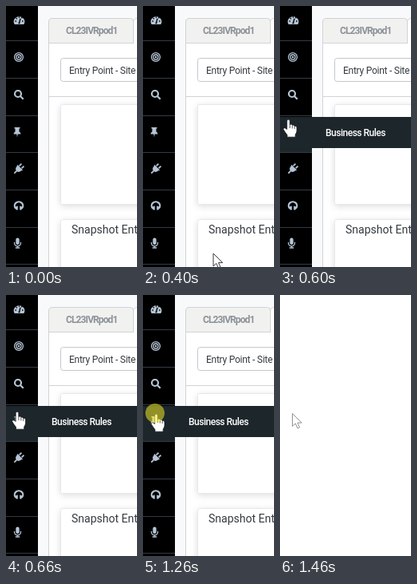
An HTML page for the animation above (1.53 s loop, 164x327 px).

```html
<!DOCTYPE html>
<html lang="en">
<head>
<meta charset="utf-8">
<title>Sidebar hover</title>
<style>
html, body { margin: 0; width: 100%; height: 100%; overflow: hidden; background: #fff; }
svg { display: block; width: 164px; height: 327px; }
text { font: 12px Roboto, sans-serif; letter-spacing: -.25px; fill: #343a40; }
.tab { font-weight: 700; letter-spacing: -.9px; fill: #8c9299; }
.title { font-size: 14px; letter-spacing: 0; }
.tip { font-weight: 500; letter-spacing: -.5px; fill: #fff; }
.edge { stroke: #d0d3d6; }
.icon { fill: #b5c5d5; }
.icon .line { fill: none; stroke: #b5c5d5; stroke-width: 1.3; }
.icon .thick { stroke-width: 2.2; }
.icon .cut { fill: none; stroke: #000; stroke-width: 1.4; }
.card { fill: #fff; stroke: #e8e8e8; filter: drop-shadow(0 2px 4px #0002); }
</style>
</head>
<body>
<svg viewBox="0 0 164 327">
  <g id="page">
    <rect width="164" height="327" fill="#f8f9fa"/>
    <path class="edge" d="M53.5 327V46.5H165V327" fill="#fff"/>
    <path class="edge" d="M53.5 46.5V20q0-4.5 4.5-4.5H155.5q4 0 4 4V46.5Z" fill="#f1f1ef"/>
    <path d="M160 47V20q0-4.5 5-4.5V47" fill="#fff"/>
    <path class="edge" d="M159.5 47V20q0-4.5 5-4.5M53 113.5H164" fill="none"/>
    <text class="tab" x="75" y="35">CL23IVRpod1</text>
    <rect x="68.5" y="65.5" width="110" height="29" rx="3" fill="#fff" stroke="#c4c8cc"/>
    <text x="79" y="85">Entry Point - Site</text>
    <rect class="card" x="68.5" y="123.5" width="110" height="125" rx="2"/>
    <rect class="card" x="68.5" y="267.5" width="110" height="80" rx="3"/>
    <text class="title" x="82" y="285">Snapshot Entry</text>

    <rect width="40" height="327"/>
    <g id="rules"></g>
    <g id="hover">
      <rect y="139" width="40" height="44" fill="#1d262b"/>
      <rect x="40" y="139" width="124" height="39" fill="#1d262b"/>
      <text class="tip" x="57" y="163">Business Rules</text>
    </g>

    <g class="icon" transform="translate(16.5 18)">
      <path d="M-5.8 5A6.7 6.5 0 1 1 5.8 5Z"/>
      <path class="cut" d="M0 3.6L1.5-2.2M-5 1h1.5M3.5 1H5M-3.8-2.700l1.200 1M2.800-2.700l1-1M-.7-4h1.400M-1 3.500H1"/>
    </g>
    <g class="icon" transform="translate(16 64)">
      <circle class="line" r="5.4"/>
      <circle class="line" r="3"/>
      <circle r="1.3"/>
    </g>
    <g class="icon" transform="translate(16 111)">
      <circle class="line thick" cx="-1" cy="-1" r="4"/>
      <path class="line thick" d="M2 2L5.7 5.700"/>
    </g>
    <g class="icon" transform="translate(14 158)">
      <path d="M-3.500-6H3.500V-4.500H2.500V-.5Q4.500.5 4.500 2.500H.7L0 6.500L-.7 2.500H-4.500Q-4.500.5-2.500-.5V-4.500H-3.500Z"/>
    </g>
    <g class="icon" transform="translate(16 204) rotate(45)">
      <path d="M-4.500-2.500H4.500V-1H4Q4 3 .9 3.800V8H-.9V3.800Q-4 3-4-1H-4.500ZM-3-7h1.800v4H-3ZM1.200-7H3v4H1.200Z"/>
    </g>
    <g class="icon" transform="translate(16 250)">
      <path class="line thick" d="M-4 3.500A5.200 5 0 1 1 4 3.500"/>
      <path d="M-1.200.5V5.500H-3Q-5 4.500-4.500 2Q-4 .5-1.200.5ZM1.200.5V5.500H3Q5 4.500 4.500 2Q4 .5 1.200.5Z"/>
    </g>
    <g class="icon" transform="translate(14.5 297)">
      <rect x="-2.2" y="-6.5" width="4.4" height="8.5" rx="2.2"/>
      <path class="line" d="M-4-1V0A4 3.800 0 0 0 4 0V-1M0 4V6M-2.700 6H2.700"/>
    </g>
  </g>
  <path id="arrow" d="M0 0V16L3.800 12.500L6.500 18.500L9 17.400L6.500 11.600H11.700Z" fill="#fff" stroke="#222" stroke-width=".9"/>
  <g id="hand">
    <path d="M-1.800 1.500Q0-1.200 1.800 1.500V6.500Q4 5.200 4.800 7.300Q7 6.300 7.700 8.500Q10.300 7.700 10.500 10.300V15Q10 17.500 8.700 19V22.200H-1.500V19.500Q-4 16.500-6.300 12.500Q-6.200 9-1.800 12.500Z" fill="#fff" stroke="#111" stroke-width=".7"/>
    <path d="M1.900 6.500V11M4.800 7.500V11.500M7.700 8.500V12" fill="none" stroke="#111" stroke-width=".7"/>
  </g>
  <circle id="click" cx="15" cy="148" r="12" fill="#fff424" fill-opacity=".52"/>
</svg>
<script>
const LOOP = 1530, HOVER = 600, CLICK = 1260, BLANK = 1460;
// Pointer steps: time, x, y
const steps = [
  [400, 88, 310], [470, 66, 265], [540, 39, 212],
  [600, 10.5, 142], [660, 14, 146], [730, 16.5, 149], [BLANK, 15.5, 148.5]
];
const el = id => document.getElementById(id);
const show = (id, on) => el(id).style.display = on ? "" : "none";

el("rules").innerHTML = Array.from({ length: 7 }, (_, i) =>
  `<rect y="${Math.round(43.3 + 46.65 * i)}" width="40" height="1" fill="#343b45"/>`).join("");

function draw(now) {
  const t = now % LOOP;
  const step = steps.findLast(s => s[0] <= t);
  const blank = t >= BLANK;
  const hover = t >= HOVER && !blank;
  show("page", !blank);
  show("hover", hover);
  show("click", t >= CLICK && !blank);
  show("hand", hover);
  show("arrow", step && !hover);
  el("arrow").style.opacity = blank ? .55 : 1;
  if (step) {
    const pointer = el(hover ? "hand" : "arrow");
    pointer.setAttribute("transform", `translate(${step[1]} ${step[2]})`);
  }
}

const start = performance.now();
function tick() {
  draw(performance.now() - start);
  requestAnimationFrame(tick);
}
tick();
</script>
</body>
</html>
```
